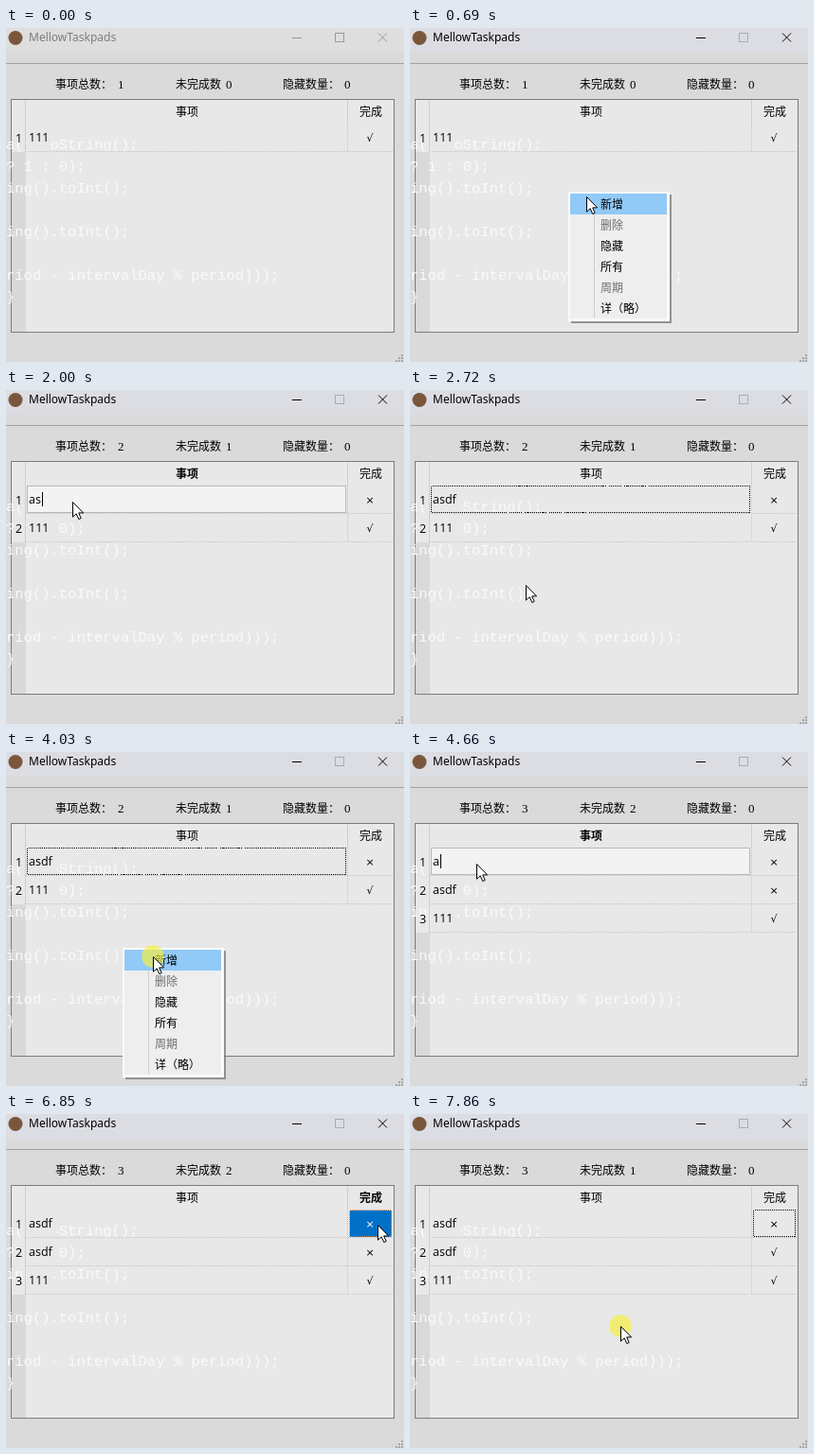
An HTML page for the animation above (8 s loop, 420 by 353 pixels).

```html
<!DOCTYPE html>
<html lang="zh">
<head>
<meta charset="utf-8">
<title>Task list</title>
<style>
html, body { margin: 0; width: 100%; height: 100%; overflow: hidden; background: #dadada; }
svg { display: block; width: 420px; height: 353px; }
text { font: 12px "Noto Sans CJK SC", "Noto Sans CJK", sans-serif; fill: #000; white-space: pre; }
rect, line, .crisp { shape-rendering: crispEdges; }
.mid { text-anchor: middle; }
.bold { font-weight: 700; }
.code { font: 15.5px "Liberation Mono", monospace; fill: #fafafa; }
.latin { font: 12.5px "Open Sans", "Noto Sans", sans-serif; }
.digit { font: 13px "Liberation Serif", serif; }
.sign { font: 11px "DejaVu Sans", sans-serif; }
.title { font: 12px "Noto Sans", sans-serif; }
.win { stroke: #000; fill: none; }
.box { stroke: #a3adba; }
.bar { fill: #dcdde3; }
.idle .title { fill: #7d7d7d; }
.idle .win { stroke: #999; }
.idle .bar { fill: #dedede; }
.grid { stroke: #c4c4c4; stroke-dasharray: 1 1; }
.rule { stroke: #cfcfcf; }
.focus { fill: none; stroke: #000; stroke-dasharray: 1 1; stroke-dashoffset: 1; }
.sel { fill: #0070c6; stroke: #d8813a; stroke-dasharray: 1 1; }
.edit { fill: #f3f3f3; stroke: #b8b8b8; }
.white { fill: #fff; }
.off { fill: #6d6d6d; }
</style>
</head>
<body>
<svg viewBox="0 0 420 353">
  <rect width="420" height="353" fill="#dadada"/>
  <g id="frame">
    <rect class="bar" width="420" height="26"/>
    <circle cx="10" cy="10.5" r="7.5" fill="#7a573c"/>
    <text class="title" x="24" y="14">MellowTaskpads</text>
    <path class="win crisp" d="M302 10.5H312"/>
    <rect class="win box" x="347.5" y="5.5" width="9" height="9"/>
    <path class="win" d="M393 5.5 402 14.5M402 5.5 393 14.5"/>
  </g>
  <path class="crisp" d="M0 37.5H420" stroke="#a2a2a2"/>
  <rect x="5.5" y="75.5" width="404" height="246" fill="#e8e8e8" stroke="#7c7c7c"/>
  <g id="live"></g>
  <g id="grip" fill="#a6a6a6"></g>
  <g id="menu"></g>
  <g id="mouse">
    <circle id="glow" r="11.8" fill="#f5ef3c" fill-opacity=".68"/>
    <path d="M.5 .5V16.2L4.2 12.8 6.8 18.6 9.2 17.5 6.7 11.9H11.6Z" fill="#fff" stroke="#000"/>
  </g>
</svg>
<script>
const $ = id => document.getElementById(id);
const LOOP = 8000, STEP = 78, ROW = 30, TOP = 101, WORD = 'asdf';

const text = (x, y, s, cls = '') => `<text x="${x}" y="${y}" class="${cls}">${s}</text>`;
const rect = (x, y, w, h, attrs = '') => `<rect x="${x}" y="${y}" width="${w}" height="${h}" ${attrs}/>`;
const line = (x1, y1, x2, y2, cls) => `<line x1="${x1}" y1="${y1}" x2="${x2}" y2="${y2}" class="${cls}"/>`;
const within = (t, a, b) => t >= a && t < b;

const code = ['a().toString();', '? 1 : 0);', 'ing().toInt();', '', 'ing().toInt();', '',
  'riod - intervalDay % period)));', '}'];
const items = ['新增', '删除', '隐藏', '所有', '周期', '详（略）'];

// Each round adds a row from the menu, then names it.
const rounds = [
  { at: [166, 172], open: 520, pick: 840, edit: 1480, type: 1850, done: 2480, end: [118, 214] },
  { at: [122, 206], open: 3640, pick: 4030, edit: 4420, type: 4660, done: 5280, end: [127, 227] }
];
const added = r => r.pick + 2 * STEP;
const TICK = 6690, TOGGLE = TICK + 5 * STEP;

// from, until, then the place reached
const moves = [[150, 360, ...rounds[0].at], [2560, 2710, ...rounds[1].at],
  [5510, 6290, 355, 111], [6450, 6680, 392, 117], [7160, 7780, 222, 224]];
const presses = [TICK, TICK + 3 * STEP, 7860];
const marks = [[0, ''], [TICK, 'sel', 0, 1], [TOGGLE, 'focus', 0, 1]];

for (const r of rounds) {
  const [x, y] = r.at;
  moves.push([r.open + STEP, r.pick - STEP, x + 33, y + 10],
    [r.pick + STEP, r.pick + 4 * STEP, 70, 118],
    [r.type + 4 * STEP, r.done - STEP, ...r.end]);
  presses.push(r.open - STEP, r.pick, r.edit, r.done);
  marks.push([added(r), 'focus', 1, 0], [r.edit, 'sel', 0, 0], [r.edit + 2 * STEP, 'edit', 0, 0],
    [r.done, 'sel', 0, 0], [r.done + STEP, 'focus', 0, 0]);
}
moves.sort((a, b) => a[0] - b[0]);
marks.sort((a, b) => a[0] - b[0]);

function rowsAt(t) {
  const rows = [['111', '√']];
  for (const r of rounds)
    if (t >= added(r)) rows.unshift([WORD.slice(0, Math.max(0, Math.floor((t - r.type) / STEP) + 1)), '×']);
  if (t >= TOGGLE) rows[1][1] = '√';
  return rows;
}

function pointer(t) {
  let x = 282, y = 264;
  for (const [from, until, toX, toY] of moves) {
    const u = Math.min(1, Math.max(0, (t - from) / (until - from)));
    const k = u * u * (3 - 2 * u);
    x += (toX - x) * k;
    y += (toY - y) * k;
  }
  return [Math.round(x), Math.round(y)];
}

function table(t) {
  const rows = rowsAt(t);
  const [, kind, row, col] = marks.findLast(m => m[0] <= t);
  const hot = kind === 'sel' || kind === 'edit';
  const open = rows.filter(r => r[1] === '×').length;
  const bold = on => on ? ' bold' : '';
  const bottom = TOP + rows.length * ROW;
  let s = rect(6, bottom, 15, 321 - bottom, 'fill="#d9d9d9"');
  code.forEach((c, i) => s += text(0, 128 + i * 23, c, 'code'));

  [[52, '事项总数：', 118, rows.length], [179, '未完成数', 232, open], [292, '隐藏数量：', 357, 0]]
    .forEach(([x, label, nx, n]) => s += text(x, 64, label) + text(nx, 64, n, 'digit'));
  s += text(191, 93, '事项', 'mid' + bold(hot && col === 0));
  s += text(385, 93, '完成', 'mid' + bold(hot && col === 1));
  s += line(20.5, 76, 20.5, bottom, 'rule') + line(360.5, 76, 360.5, TOP, 'rule');
  s += line(360.5, TOP, 360.5, bottom, 'grid');

  rows.forEach(([name, done], i) => {
    const y = TOP + i * ROW, here = i === row;
    const lit = c => here && kind === 'sel' && col === c ? ' white' : '';
    if (name) s += rect(22, y + 2, name.length * 7 + 4, 26, 'fill="#e8e8e8"');
    s += line(21, y + 29.5, 409, y + 29.5, 'grid');
    if (here && kind) s += rect(col ? 362.5 : 22.5, y + .5, col ? 44 : 336, 28, `class="${kind}"`);
    if (here && kind === 'edit') {
      const caret = 25.5 + Math.round(name.length * 6.6);
      s += line(caret, y + 7, caret, y + 22, 'win');
    }
    s += text(13.5, y + 20, i + 1, 'latin mid' + bold(here && hot));
    s += text(24, y + 19, name, 'latin' + lit(0));
    s += text(384, y + 19, done, 'sign mid' + lit(1));
  });
  return s;
}

function menu(t) {
  const r = rounds.find(r => within(t, r.open, r.pick + STEP));
  if (!r) return '';
  const x = r.at[0] + 1, y = r.at[1] + 1;
  let s = rect(x + 3, y + 3, 106, 136, 'fill="#777" fill-opacity=".75"');
  s += rect(x, y, 107, 137, 'fill="#fafafa"') + rect(x + 2, y + 2, 102, 132, 'fill="#eeeeee"');
  s += line(x + 27.5, y + 2, x + 27.5, y + 134, 'rule');
  if (t >= r.open + 2 * STEP) s += rect(x + 2, y + 2, 102, 22, 'fill="#91c9f7"');
  items.forEach((m, i) => s += text(x + 34, y + 18 + i * 22, m, i % 3 === 1 ? 'off' : ''));
  return s;
}

const shown = {};
function put(id, html) {
  if (shown[id] !== html) $(id).innerHTML = shown[id] = html;
}

function draw(t) {
  put('live', table(t));
  put('menu', menu(t));
  $('frame').setAttribute('class', t < rounds[0].open ? 'idle' : '');
  $('mouse').style.display = t < 150 ? 'none' : '';
  $('mouse').setAttribute('transform', `translate(${pointer(t)})`);
  $('glow').style.display = presses.some(p => within(t, p, p + STEP) || t >= 7860) ? '' : 'none';
}

let dots = '';
for (let r = 0; r < 3; r++)
  for (let c = 0; c <= r; c++) dots += rect(417 - c * 3, 345 + r * 3, 2, 2);
$('grip').innerHTML = dots;

const begin = performance.now();
function tick() {
  draw((performance.now() - begin) % LOOP);
  requestAnimationFrame(tick);
}
tick();
</script>
</body>
</html>
```
